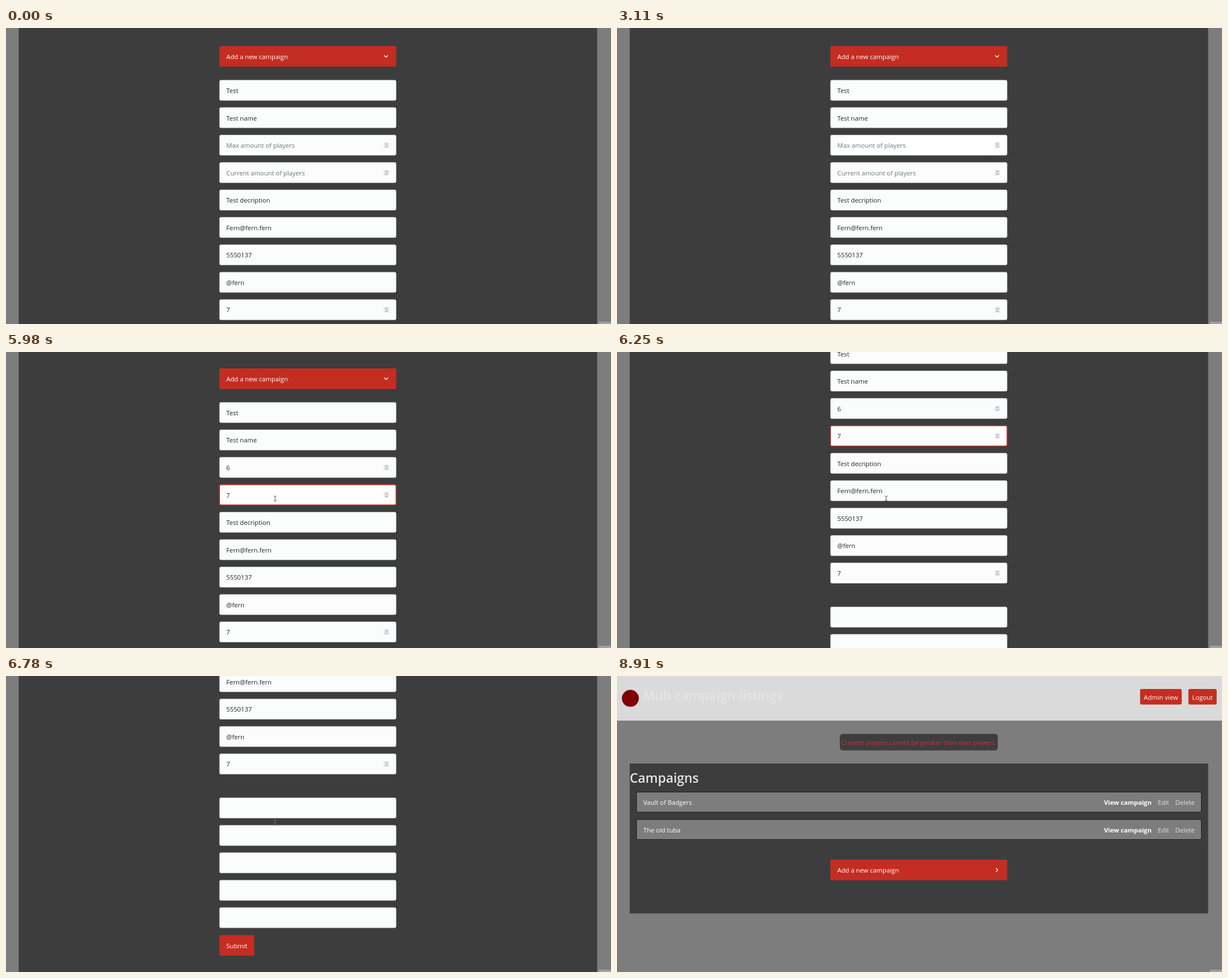
An HTML page for the animation above (9770 ms loop, 1069 px wide and 524 px high).

```html
<!DOCTYPE html>
<html lang="en">
<head>
<meta charset="utf-8">
<title>Campaign form</title>
<style>
  html, body { margin: 0; width: 100%; height: 100%; overflow: hidden; background: #7d7d7d; }
  svg { display: block; width: 1069px; height: 524px; }
  text { font: 11.25px "Open Sans", "Noto Sans", sans-serif; fill: #212529; white-space: pre; }
  .light { fill: #fff; }
  .soft { fill: #e2e2e2; }
  .hint { fill: #6c757d; }
  .bold { font-weight: 700; font-size: 11.2px; }
  .title { font-weight: 600; font-size: 22.9px; fill: #e6e4e5; }
  .alert { fill: #d5322a; text-anchor: middle; }
  .end { text-anchor: end; }
  .panel { fill: #3d3d3d; }
  .red { fill: #c42d22; }
  .field { fill: #fbfdfd; stroke: #ced4da; stroke-width: .7; }
  .focus { fill: #fff; stroke: #c42d22; }
  .row { fill: #7d7d7d; stroke: #181818; }
  .chevron { fill: none; stroke: #fff; stroke-width: 1.3; stroke-linecap: round; stroke-linejoin: round; }
  .spin { fill: none; stroke: #77777c; stroke-width: .9; }
  .caret { fill: #212529; }
  #beam { fill: none; stroke: #b8b8b8; stroke-width: .9; mix-blend-mode: difference; }
  #arrow, #hand { fill: #fff; stroke: #000; stroke-width: .7; stroke-linejoin: round; }
</style>
</head>
<body>
<svg viewBox="0 0 1069 524">
  <rect width="1069" height="524" fill="#7d7d7d"/>
  <g id="form"></g>
  <g id="list"></g>
  <rect x="1047.5" y="520" width="21.5" height="4" fill="#a2a2a2"/>
  <g id="cursor">
    <path id="beam" d="M-2.6-4.3H-.7L0-3.8 .7-4.3H2.6M-2.6 4.3H-.7L0 3.8 .7 4.3H2.6M0-3.8V3.8"/>
    <path id="arrow" d="M0 0V11L2.5 8.7 4.2 12.6 5.9 11.9 4.2 8.1H7.6Z"/>
    <path id="hand" d="M0 0Q1.6-.8 1.8 1V4.2L6.4 5.3Q7.4 5.7 7.2 7L6.3 11.5H.6L-2.5 7.2Q-2.6 5.8-1.2 6.3L0 7.2Z"/>
  </g>
</svg>
<script>
const LOOP = 9770, PITCH = 48.56, LEFT = 377, WIDTH = 312.5, HEIGHT = 36.5;
const BLINK = 530, PAGE_SWITCH = 7550, LOGO = 7720;
const $ = id => document.getElementById(id);

const box = (cls, x, y, w, h, r = 2.5, extra = '') =>
  `<rect class="${cls}" x="${x}" y="${y}" width="${w}" height="${h}" rx="${r}" ${extra}/>`;
const label = (text, x, y, cls = '', extra = '') =>
  `<text class="${cls}" x="${x}" y="${y}" ${extra}>${text}</text>`;
const field = y => box('field', LEFT + .3, y + .3, WIDTH - .6, HEIGHT - .6);
const spinner = y => box('', 667.2, y + 13.2, 10, 10.4, 1.5, 'fill="#e9e9ed"') +
  `<path class="spin" d="M670 ${y + 17.4}l2.2-2 2.2 2M670 ${y + 19.6}l2.2 2 2.2-2"/>`;
const accordion = (y, chevron) => box('red', LEFT, y, WIDTH, HEIGHT) +
  label('Add a new campaign', 389.3, y + 23, 'light') + `<path class="chevron" d="${chevron}"/>`;

// A number field that gains focus and then a typed digit
const numberField = (id, y, hint, digit) => field(y) +
  `<g id="${id}">${box('focus', LEFT + .3, y + .3, WIDTH - .6, HEIGHT - .6)}</g>` +
  spinner(y) + label(hint, 389.3, y + 23, 'hint', `id="${id}Hint"`) +
  label(digit, 389.3, y + 23, '', `id="${id}Digit"`) +
  box('caret', 389.3, y + 9.8, .9, 16, 0, `id="${id}Caret"`);

const rowY = i => 92 + PITCH * i;
const filled = ['Test', 'Test name', null, null, 'Test decription', 'Fern@fern.fern', '5550137', '@fern', '7'];

$('form').innerHTML =
  box('panel', 22.5, -200, 1022, 1300, 0) +
  accordion(32, 'M668.6 48.8l3 3 3-3') +
  filled.map((text, i) => text ? field(rowY(i)) + label(text, 389.3, rowY(i) + 23) : '').join('') +
  spinner(rowY(8)) +
  numberField('max', rowY(2), 'Max amount of players', '6') +
  numberField('now', rowY(3), 'Current amount of players', '7') +
  [0, 1, 2, 3, 4].map(i => field(558.4 + PITCH * i)).join('') +
  box('red', LEFT, 801.5, 61.5, HEIGHT) + label('Submit', 389.3, 824.5, 'light');

const campaign = (name, y) => box('row', 34.5, y, 998, 35.5, 3) +
  label(name, 46.5, y + 22.5, 'light') +
  label('View campaign', 944.5, y + 22.5, 'light bold end') +
  label('Edit', 975.5, y + 22.5, 'soft end') + label('Delete', 1020.5, y + 22.5, 'soft end');

$('list').innerHTML =
  box('', 0, 0, 1069, 79, 0, 'fill="#dadada"') +
  '<circle id="logo" cx="23.6" cy="39.6" r="15" fill="#800000"/>' +
  label('Mub campaign listings', 46, 43, 'title') +
  box('red', 924.3, 23, 73.5, 27.5) + label('Admin view', 961, 42, 'light', 'text-anchor="middle"') +
  box('red', 1009.6, 23, 50, 27.5) + label('Logout', 1034.6, 42, 'light', 'text-anchor="middle"') +
  box('panel', 393.8, 102.5, 279, 29.3, 5) +
  label('Current players cannot be greater than max players.', 533.4, 122, 'alert') +
  box('panel', 22.5, 155, 1022, 265.3, 0) +
  label('Campaigns', 22.5, 189, 'title') +
  campaign('Vault of Badgers', 205.5) + campaign('The old tuba', 254) +
  accordion(325, 'M669.9 340.5l3 3-3 3');

const easeOut = p => 1 - (1 - p) ** 2;
const linear = p => p;

// Value of a track of [time, value, ...] points at time t
function along(track, t, ease = linear) {
  const next = track.findIndex(point => point[0] > t);
  if (next < 0) return track[track.length - 1].slice(1);
  if (next === 0) return track[0].slice(1);
  const a = track[next - 1], b = track[next];
  const p = ease((t - a[0]) / (b[0] - a[0]));
  return a.slice(1).map((v, i) => v + (b[i + 1] - v) * p);
}

const scroll = [[5920, 0], [5980, 2.7], [6250, 107], [6520, 221.5], [6780, 343]];
const pointer = [
  [70, 999, 476], [860, 476.5, 208.5], [1070, 476.5, 208.5], [1120, 471.5, 208.5],
  [1330, 470, 208.5], [1390, 460.5, 211], [3300, 460.5, 211], [4050, 452.5, 257.5],
  [4180, 452.5, 257.5], [4250, 455.5, 259.5], [4660, 455.5, 259.5], [4850, 475.5, 259.5],
  [6800, 475.5, 259.5], [7400, 421, 474], [8580, 421, 474], [8910, 859, 503]
];
const pointerShown = [[70, 3110], [3300, 5240], [5710, 8910]];

const inside = (t, from, to) => t >= from && t < to;
const show = (id, on) => $(id).setAttribute('visibility', on ? 'inherit' : 'hidden');

function drawNumber(id, t, { focus, caret, press, typed, blur }) {
  const focused = inside(t, focus, blur), hasDigit = t >= typed;
  // Pale edge while empty, strong edge once a digit is entered
  const [edge] = along([[focus, 0], [focus + 200, .35], [press, .35], [press + 200, 1]], t);
  const ring = $(id).firstChild;
  show(id, focused);
  ring.setAttribute('stroke-opacity', edge);
  ring.setAttribute('stroke-width', .5 + edge);
  show(id + 'Hint', !hasDigit);
  show(id + 'Digit', hasDigit);
  const since = t - (hasDigit ? typed : caret);
  show(id + 'Caret', focused && (since < 0 || Math.floor(since / BLINK) % 2 === 0));
  $(id + 'Caret').setAttribute('x', hasDigit ? 395.6 : 389.3);
}

function drawPointer(t) {
  const [x, y] = along(pointer, t, easeOut);
  const onSubmit = inside(t, 6800, PAGE_SWITCH) && x < 438.5 && y > 458;
  const kind = onSubmit ? 'hand' : x > 690 || t >= PAGE_SWITCH ? 'arrow' : 'beam';
  show('cursor', pointerShown.some(([from, to]) => inside(t, from, to)));
  for (const id of ['beam', 'arrow', 'hand']) {
    $(id).style.display = id === kind ? '' : 'none';
    $(id).setAttribute('transform', `translate(${x} ${y})`);
  }
}

function draw() {
  const t = performance.now() % LOOP;
  $('form').setAttribute('transform', `translate(0 ${-along(scroll, t)[0]})`);
  drawNumber('max', t, { focus: 2050, caret: 2240, press: 3110, typed: 3180, blur: 4660 });
  drawNumber('now', t, { focus: 4660, caret: 4720, press: 5240, typed: 5240, blur: LOOP });
  show('form', t < PAGE_SWITCH);
  show('list', t >= PAGE_SWITCH);
  show('logo', t >= LOGO);
  drawPointer(t);
  requestAnimationFrame(draw);
}
draw();
</script>
</body>
</html>
```
